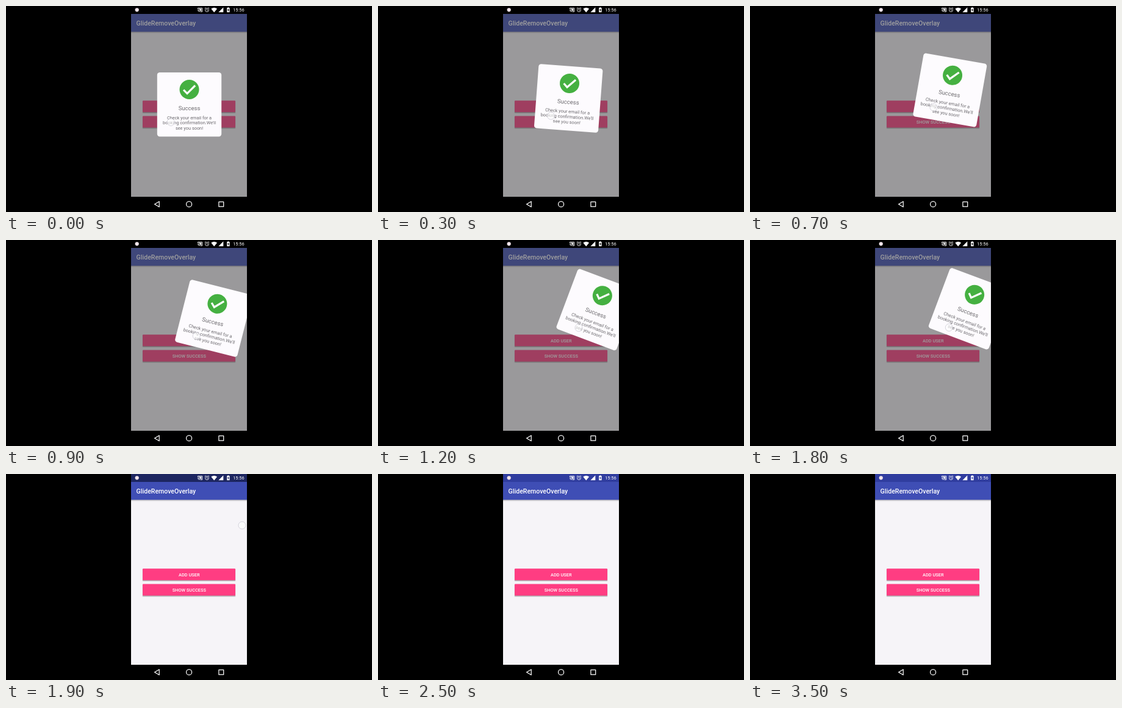
Write an HTML page that moves like this. It is 600 px wide and 338 px high and loops after 3700 ms.

```html
<!DOCTYPE html>
<html lang="en">
<head>
<meta charset="utf-8">
<title>Swipe to dismiss</title>
<style>
  html, body { margin: 0; width: 100%; height: 100%; overflow: hidden; background: #000; }
  svg { display: block; width: 100vw; height: 100vh; }
  text { font-family: Roboto, "Noto Sans", sans-serif; font-size: 7.39px; }
  .mid { text-anchor: middle; }
  .bold { font-weight: 500; fill: #fff; }
  .title { font-size: 10.55px; }
  .head { font-size: 9.5px; }
  .line { fill: none; stroke: #fff; }
</style>
</head>
<body>
<svg viewBox="0 0 600 338">
  <defs>
    <clipPath id="screen"><rect x="205" y="13" width="190" height="300"/></clipPath>
    <linearGradient id="fade" x2="0" y2="1">
      <stop stop-color="#000" stop-opacity=".3"/>
      <stop offset="1" stop-color="#000" stop-opacity="0"/>
    </linearGradient>
    <g id="button">
      <rect x="223.6" y=".8" width="152.8" height="20" rx="1.2" fill="#000" opacity=".13"/>
      <rect x="224" y=".5" width="152" height="19.6" rx="1" fill="#000" opacity=".2"/>
      <rect x="224" width="152" height="19" rx="1" fill="#ff3d82"/>
    </g>
  </defs>

  <rect width="600" height="338"/>
  <rect id="status" x="205" width="190" height="13"/>
  <rect x="205" y="13" width="190" height="300" fill="#f6f4f8"/>
  <rect x="205" y="42" width="190" height="3" fill="url(#fade)"/>
  <rect x="205" y="13" width="190" height="29.3" fill="#3f4eb5"/>
  <text class="bold title" x="213.6" y="31.6">GlideRemoveOverlay</text>
  <use href="#button" y="155.3"/>
  <use href="#button" y="180.6"/>
  <text class="bold mid" x="300.3" y="167.7">ADD USER</text>
  <text class="bold mid" x="300.3" y="193">SHOW SUCCESS</text>

  <!-- status icons -->
  <g fill="#fff">
    <circle cx="214.7" cy="6.3" r="3.1" fill="#f1e4ea"/>
    <path class="line" stroke-width=".9" d="M314.4 5V3.4H321.7V9.4H318.7M314.2 5.9A3.8 3.8 0 0 1 317.8 9.6M314.2 7.5A2 2 0 0 1 316.1 9.6"/>
    <path d="M315.6 4.6H320.4V8.2H318.7A4 4 0 0 0 315.6 5.1Z"/>
    <circle class="line" cx="329.5" cy="6.6" r="2.9" stroke-width=".9"/>
    <path class="line" stroke-width=".8" d="M329.5 4.8V6.8L330.8 7.6M325.7 4L327.6 2.5M333.3 4L331.4 2.5"/>
    <path d="M336.3 4.5Q341.2 .8 346.1 4.5L341.2 10.5Z"/>
    <path d="M356.3 2.3V10.2H348.4Z"/>
    <path fill-rule="evenodd" d="M362.2 3H363.4V2.2H365.4V3H366.6V10.3H362.2ZM364.9 4.1L363 7H364.1V9.2L365.9 6.2H364.9Z"/>
    <text x="372.2" y="9.1">15:56</text>
  </g>

  <!-- navigation bar -->
  <g class="line" stroke-width="1.25" stroke-linejoin="round">
    <path d="M243.6 325.2L251.2 320.7V329.7Z"/>
    <circle cx="300.1" cy="325.2" r="4.5"/>
    <rect x="348.9" y="321.4" width="7.8" height="7.8"/>
  </g>

  <g clip-path="url(#screen)">
    <rect id="dim" x="205" y="13" width="190" height="300" fill="#404040" opacity=".5"/>
    <g id="card">
      <rect x="-52.7" y="-52.7" width="105.4" height="105.4" rx="4.2" fill="#fdfbfe"/>
      <circle cy="-24.6" r="16" fill="#45b041"/>
      <path class="line" stroke-width="3.2" d="M-9.4 -23.9L-3.5 -18L9.6 -31.1"/>
      <g class="mid" fill="#6c6a6e">
        <text class="head" y="9.2">Success</text>
        <text y="24">Check your email for a</text>
        <text y="32.6">booking confirmation.We'll</text>
        <text y="41.2">see you soon!</text>
      </g>
    </g>
    <circle id="touch" r="6" fill="#fff" fill-opacity=".6" stroke="#b4b2c0" stroke-opacity=".65" stroke-width=".8"/>
  </g>
</svg>
<script>
  const LOOP = 3700, TICK = 100, RELEASE = 1900;
  // time, card x, card y, card angle, touch x, touch y
  const drag = [
    [0, 300.5, 161.6, 0, 270.3, 190.6],
    [700, 327.8, 138, 10, 301, 166.3],
    [1200, 359.2, 114.3, 20.6, 329, 144],
    [1600, 359.5, 112.8, 20.6, 326.3, 143.6],
    [1800, 359.5, 112.8, 20.6, 326.3, 143.6]
  ];
  const barFade = ["#1d2660", "#283587", "#303d9f"];
  const [bar, dim, card, touch] = ["status", "dim", "card", "touch"].map(id => document.getElementById(id));

  function poseAt(t) {
    let i = 0;
    while (i < drag.length - 2 && t >= drag[i + 1][0]) i++;
    const a = drag[i], b = drag[i + 1];
    const k = Math.min(1, (t - a[0]) / (b[0] - a[0]));
    return a.map((v, j) => v + (b[j] - v) * k);
  }

  const show = (el, on) => el.setAttribute("visibility", on ? "visible" : "hidden");

  function draw(time) {
    const t = Math.floor((time % LOOP) / TICK) * TICK;
    const open = t < RELEASE;
    show(dim, open);
    show(card, open);
    show(touch, t <= RELEASE);
    const fadeStep = Math.min(2, (t - RELEASE) / TICK);
    bar.setAttribute("fill", open ? "#000" : barFade[fadeStep]);

    let [, x, y, angle, tx, ty] = poseAt(t);
    if (!open) [tx, ty] = [387, 84.2];
    card.setAttribute("transform", `translate(${x} ${y}) rotate(${angle})`);
    touch.setAttribute("transform", `translate(${tx} ${ty})`);
  }

  const start = performance.now();
  function frame() {
    draw(performance.now() - start);
    requestAnimationFrame(frame);
  }
  frame();
</script>
</body>
</html>
```
